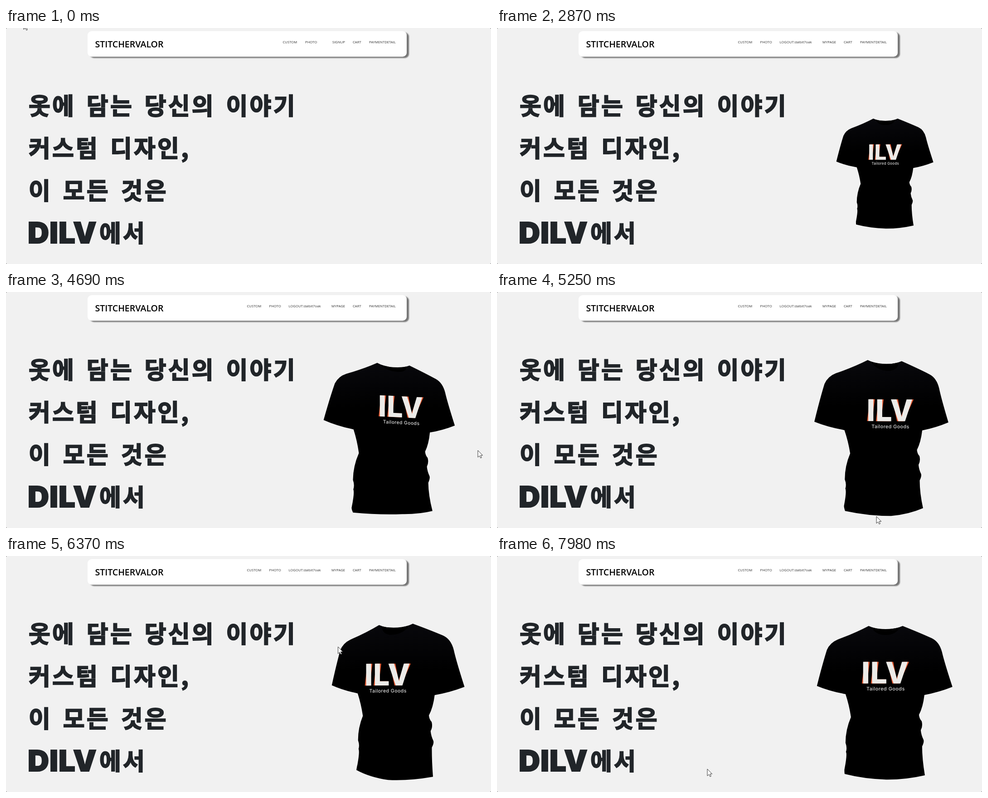
An HTML page for the animation above (8 s loop, 1070x523 px).

```html
<!DOCTYPE html>
<html lang="ko">
<head>
<meta charset="utf-8">
<title>Custom shirts</title>
<style>
  html, body { margin: 0; width: 100%; height: 100%; overflow: hidden; background: #f1f1f1; }
  svg { display: block; width: 1070px; height: 523px; }
  .head { font: 900 52px "Noto Sans CJK KR", "Noto Sans CJK", sans-serif; letter-spacing: 4.2px; word-spacing: 5px;
    fill: #212529; stroke: #212529; stroke-width: 2; }
  .head .latin { font: 900 65px Inter, sans-serif; letter-spacing: 1px; word-spacing: 0; }
  .brand { font: 600 19.5px "Open Sans", "Noto Sans", sans-serif; fill: #000; }
  .nav { font: 400 7.7px "Open Sans", "Noto Sans", sans-serif; fill: #333; }
  .mark { font: 800 66px Inter, sans-serif; letter-spacing: 1px; }
  .tag { font: 500 10.8px Inter, sans-serif; letter-spacing: .5px; fill: #dcdcdc; }
</style>
</head>
<body>
<svg viewBox="0 0 1070 523">
  <defs>
    <linearGradient id="cloth" x1="0" y1="0" x2="0" y2="1">
      <stop offset="0" stop-color="#08080c"/>
      <stop offset=".3" stop-color="#000"/>
    </linearGradient>
    <filter id="drop" x="-5%" y="-20%" width="110%" height="150%">
      <feDropShadow dx="5" dy="3" stdDeviation="1.3" flood-color="#777"/>
    </filter>
  </defs>
  <rect width="1070" height="523" fill="#777"/>
  <rect width="1070" height="523" rx="3" fill="#f1f1f1"/>
  <rect x="180" y="7" width="704" height="56.5" rx="9" fill="#fff" filter="url(#drop)"/>
  <text class="brand" x="196.5" y="42.5">STITCHERVALOR</text>
  <g class="nav" id="guest"></g>
  <g class="nav" id="member"></g>
  <g class="head">
    <text x="50" y="192">옷에 담는 당신의 이야기</text>
    <text x="50" y="286">커스텀 디자인,</text>
    <text x="50" y="380">이 모든 것은</text>
    <text class="latin" x="48" y="477">DILV</text>
    <text x="206" y="474">에서</text>
  </g>
  <g id="shirt">
    <path id="body" fill="url(#cloth)"/>
    <path id="neck" fill="#000"/>
    <g id="print" text-anchor="middle">
      <text class="mark" y="23.5" fill="#e4582f" transform="translate(0 0) skewX(-7)">ILV</text>
      <text class="mark" y="23.5" fill="#ecebe8">ILV</text>
      <text class="tag" x="1" y="39">Tailored Goods</text>
    </g>
  </g>
  <path id="cursor" d="M0 0V15.2L3.6 12L6 17L8.3 16L6 11H10.6Z" fill="#fff" stroke="#222" stroke-width=".9"/>
</svg>
<script>
const $ = id => document.getElementById(id);
const LOOP = 8000, STEP = 70, LOGIN = 630;
const CX = 856, CY = 325.5, DEPTH = 700, PRINT_Y = 259, PRINT_Z = 56;

const BODY = `M820 155 Q835 162 857 163 Q880 162 895 155 Q935 171 959 182 Q976 190 982 213
  Q987 235 1005 290 Q975 302 943 308 Q940 335 931 352 Q932 361 937 366 Q940 377 935 386
  Q936 397 941 407 Q943 412 938 422 Q938 450 944 486 Q900 496 858 495.5 Q810 494 767 483
  Q766 474 767 471 Q773 440 770 434 Q773 425 769 414 Q769 385 781 357 Q777 330 769 306
  Q735 300 706 288 Q718 240 728 208 Q735 192 752 185 Q790 171 820 155Z`;
const NECK = "M826 158 Q857 166 889 158 Q880 175 857 175 Q835 175 826 158Z";

// time, value...
const GROW = [[560, 0], [1540, .027], [2380, .3], [2870, .716], [3220, .885], [3850, .982], [4690, 1]];
const TURN = [[3500, 0, 0], [3850, 0, -1], [4200, 4, -4.5], [4690, 14.5, -5], [5200, 11, 3], [5810, -1, 9],
  [6300, -13, 5], [6930, -16, -3], [7420, -6, -4], [7980, .3, 0]];
const IDLE = [[0, 39, -12], [1540, 40, -13], [2380, 38, -12], [2520, 43, -14], [2660, 46, -30]];
const MOVE = [[3640, 868, 59], [3850, 862, 176], [4060, 880, 205], [4480, 1054, 290], [4690, 1041, 351],
  [4900, 985, 440], [5180, 870, 498], [5460, 740, 490], [5740, 661, 455], [5880, 635, 410], [6160, 665, 300],
  [6580, 815, 127], [6790, 872, 105], [6930, 910, 113], [7100, 905, 165], [7420, 710, 395], [7700, 560, 455], [7980, 464, 472]];
MOVE.splice(9, 0, [5810, 640, 431]);

// Monotone cubic through the keys, column by column
function follow(keys, t) {
  const n = keys.length - 1;
  if (t <= keys[0][0]) return keys[0].slice(1);
  if (t >= keys[n][0]) return keys[n].slice(1);
  const i = keys.findIndex(k => k[0] > t) - 1;
  const h = keys[i + 1][0] - keys[i][0], u = (t - keys[i][0]) / h;
  return keys[i].slice(1).map((a, c) => {
    const slope = j => (keys[j + 1][c + 1] - keys[j][c + 1]) / (keys[j + 1][0] - keys[j][0]);
    const tangent = j => {
      if (j < 1 || j >= n) return 0;
      const p = slope(j - 1), q = slope(j);
      return p * q > 0 ? 2 * p * q / (p + q) : 0;
    };
    const b = keys[i + 1][c + 1], v = 1 - u;
    return a * v * v * (1 + 2 * u) + b * u * u * (3 - 2 * u)
      + h * u * v * (v * tangent(i) - u * tangent(i + 1));
  });
}

// Turns a point of the front view about the shirt's centre, with perspective
function projector(size, yaw, pitch) {
  const rad = Math.PI / 180;
  const sa = Math.sin(yaw * rad), ca = Math.cos(yaw * rad);
  const sb = Math.sin(pitch * rad), cb = Math.cos(pitch * rad);
  return (px, py, z) => {
    const m = (DEPTH - z) / DEPTH, x = (px - CX) * m, y = (py - CY) * m;
    const x1 = x * ca + z * sa, z1 = z * ca - x * sa;
    const y1 = y * cb + z1 * sb, z2 = z1 * cb - y * sb;
    const k = size * DEPTH / (DEPTH - z2);
    return [CX + x1 * k, 320 + 5.5 * size * size + y1 * k];
  };
}

const bodyDepth = (x, y) => y > 480 ? 60 * Math.max(0, 1 - ((x - CX) / 90) ** 2) : -10;
const neckDepth = (x, y) => y > 170 ? 20 : -10;

function warp(path, project, depth) {
  return path.replace(/([\d.]+) ([\d.]+)/g, (_, x, y) =>
    project(+x, +y, depth(+x, +y)).map(v => v.toFixed(2)).join(" "));
}

function drawShirt(t) {
  const [size] = follow(GROW, t);
  $("shirt").style.display = size > 0 ? "" : "none";
  if (size <= 0) return;
  const project = projector(size, ...follow(TURN, t));
  $("body").setAttribute("d", warp(BODY, project, bodyDepth));
  $("neck").setAttribute("d", warp(NECK, project, neckDepth));
  const at = (dx, dy) => project(CX + dx, PRINT_Y + dy, PRINT_Z);
  const axis = (a, b) => [(b[0] - a[0]) / 40, (b[1] - a[1]) / 40];
  const m = [...axis(at(-20, 0), at(20, 0)), ...axis(at(0, -20), at(0, 20)), ...at(0, 0)];
  $("print").setAttribute("transform", `matrix(${m.map(v => v.toFixed(4))})`);
}

function drawCursor(t) {
  const [x, y] = follow(t < MOVE[0][0] ? IDLE : MOVE, t);
  $("cursor").setAttribute("transform", `translate(${x.toFixed(1)} ${y.toFixed(1)})`);
}

function fillNav(id, items) {
  $(id).innerHTML = items.map(([x, label]) => `<text x="${x}" y="34">${label}</text>`).join("");
}
const shared = [[765, "CART"], [801, "PAYMENTDETAIL"]];
fillNav("guest", [[610.5, "CUSTOM"], [660, "PHOTO"], [720, "SIGNUP"], ...shared]);
fillNav("member", [[531.5, "CUSTOM"], [580.5, "PHOTO"], [623.5, "LOGOUT:dalbit7oak"], [718, "MYPAGE"], ...shared]);

function draw(now) {
  const t = Math.floor(now % LOOP / STEP) * STEP;
  $("guest").style.display = t < LOGIN ? "" : "none";
  $("member").style.display = t < LOGIN ? "none" : "";
  drawShirt(t);
  drawCursor(t);
}

const start = performance.now();
function tick() {
  draw(performance.now() - start);
  requestAnimationFrame(tick);
}
tick();
</script>
</body>
</html>
```
